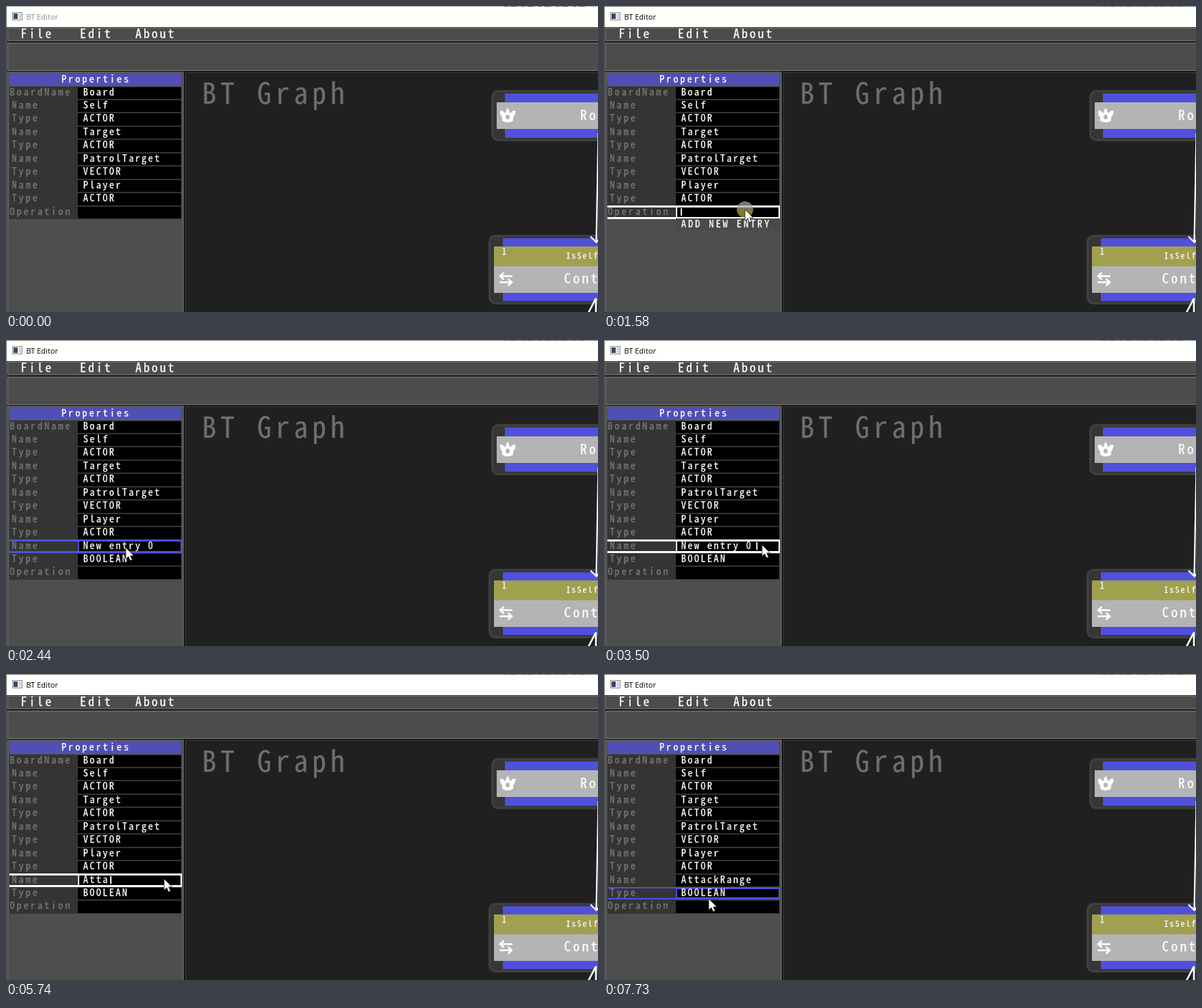
Write an HTML page that moves like this. It is 865 px wide and 448 px high and loops after 8 s.

```html
<!DOCTYPE html>
<html lang="en">
<head>
<meta charset="utf-8">
<title>BT Editor</title>
<style>
  html, body { margin: 0; width: 100%; height: 100%; overflow: hidden; background: #202020; }
  svg { display: block; width: 865px; height: 448px; }
  text { white-space: pre; }
  #title { font: 11px "Open Sans", sans-serif; }
</style>
</head>
<body>
<svg id="stage" viewBox="0 0 865 448" xmlns="http://www.w3.org/2000/svg"></svg>
<script>
const LOOP = 8000;
const ROW_TOP = 117.5, PITCH = 19.45;
const BLUE = '#5050dc', WHITE = '#fffff6';
const FONT = "'Noto Sans Mono CJK JP', 'Noto Sans Mono CJK SC', 'Noto Sans Mono', monospace";

const ruler = document.createElement('canvas').getContext('2d');
ruler.font = '100px ' + FONT;
const ADVANCE = ruler.measureText('0').width / 100;

const rect = (x, y, w, h, fill, extra = '') =>
  `<rect x="${x}" y="${y}" width="${w}" height="${h}" fill="${fill}" ${extra}/>`;
// Monospaced text with a given distance between letters.
const mono = (x, y, size, step, fill, str, id = '') =>
  `<text ${id && `id="${id}"`} x="${x}" y="${y}" font-family="${FONT}" font-size="${size}" fill="${fill}" stroke="${fill}" stroke-width=".25" letter-spacing="${(step - size * ADVANCE).toFixed(2)}">${str}</text>`;
const rowY = i => Math.round(ROW_TOP + i * PITCH);
const indent = label => label.length > 4 ? 5.5 : 8.5;

function row(i, label, value) {
  const y = rowY(i), h = rowY(i + 1) - y;
  return `<g id="row${i}">` +
    rect(5, y, 251, h, '#343434') +
    rect(105, y + 1, 151, h - 2, '#000') +
    mono(indent(label), y + 13, 14.5, 10.1, '#7a7a7a', label, 'label' + i) +
    mono(112.8, y + 13, 14.5, 9.48, WHITE, value, 'value' + i) + '</g>';
}

function node(x, y, h, blueX) {
  return rect(x + 2, y + 2, 190, h - 4, '#303030', 'rx="8" stroke="#3e3e3e" stroke-width="4"') +
    rect(x + 5, y + 5, 20, h - 10, '#363636', 'rx="4"') +
    rect(blueX, y + 5, 150, h - 10, BLUE);
}

const entries = [
  ['BoardName', 'Board'], ['Name', 'Self'], ['Type', 'ACTOR'], ['Name', 'Target'],
  ['Type', 'ACTOR'], ['Name', 'PatrolTarget'], ['Type', 'VECTOR'], ['Name', 'Player'],
  ['Type', 'ACTOR'], ['Operation', ''], ['Type', 'BOOLEAN'], ['Operation', '']
];

const titleBar =
  rect(0, 0, 865, 31, '#fffffc') +
  rect(0, 0, 865, 1, '#a8a8a8', 'id="edge"') +
  '<path d="M728 .5H850" stroke="#505050" stroke-dasharray="5 4 9 7"/>' +
  rect(9.5, 9.5, 14, 11, '#f2f2f2', 'stroke="#8c8c8c"') +
  rect(11, 11, 6, 8, '#3c4468') + rect(18.5, 11, 3.5, 8, '#cfd2da') +
  '<text id="title" x="29.5" y="20">BT Editor</text>';

const frame = 'stroke="#787878"';
const bars =
  rect(0, 31, 865, 66, '#292929') +
  rect(2.5, 32.5, 880, 18, '#4c4c4c', frame) +
  rect(2.5, 54.5, 880, 40, '#4c4c4c', frame) +
  mono(21.5, 47, 18, 11.9, '#fff', 'File') +
  mono(108, 47, 18, 11.9, '#fff', 'Edit') +
  mono(189, 47, 18, 11.9, '#fff', 'About');

const graph =
  rect(259, 95, 620, 370, '#161616') +
  rect(262.5, 97.5, 620, 370, '#202020', 'stroke="#3c3c3c"') +
  mono(286.5, 143, 41.5, 26.8, '#6e6e6e', 'BT Graph') +
  node(709, 123, 75, 729) +
  rect(717, 141, 150, 39, '#b4b4b4') +
  mono(839, 166.5, 19.5, 13, '#fff', 'Ro') +
  `<path fill="#fff" d="M722 154Q725 151 728 156L730 157Q730 153 733 149Q736 153 736 157L738 156Q741 151 744.500 154Q745 158 741 163V168Q733 173 725 168V163Q721 158 722 154Z"/>
   <ellipse cx="733" cy="162.500" rx="3" ry="3.500" fill="#b4b4b4"/>` +
  node(705, 335, 102, 726) +
  rect(713, 352, 155, 29, '#a0a04e') +
  rect(713, 381, 155, 39, '#b4b4b4') +
  mono(724.5, 364, 13, 8, '#fff', '1') +
  mono(818.5, 370, 12, 8, '#fff', 'IsSelf') +
  mono(815.5, 406, 19.5, 13, '#fff', 'Cont') +
  `<g fill="none" stroke="#fff" stroke-width="2.600">
     <path d="M740 395.500H723M727.500 390.500L722 395.500L727.500 400.500M721 404.500H738M733.500 399.500L739 404.500L733.500 409.500"/>
     <path stroke-width="2.200" d="M865.500 186L862.500 345M854 337.500L862.500 346L868 340"/>
     <path d="M851 449L862 428V449"/>
   </g>`;

const panel =
  rect(0, 95, 260, 353, '#292929') +
  rect(2.5, 97.5, 256.5, 370, '#4e4e4e', frame) +
  rect(5, 99, 251, 18, '#5050b4') +
  mono(81, 112, 14.5, 10.1, '#fff', 'Properties') +
  entries.map(([label, value], i) => row(i, label, value)).join('');

const overlay =
  `<path id="focus"/>` +
  rect(0, 296, 2, 11, WHITE, 'id="caret"') +
  `<g id="menu">${rect(106, 312, 150.5, 15.5, '#4a4a4a', 'id="option" stroke-width="2"')}
   ${mono(112.8, 324, 14.5, 10.12, '#fff', 'ADD NEW ENTRY')}</g>` +
  `<g id="pointer">
     <circle id="ring" r="12" fill="url(#glow)"/>
     <path d="M0 0V16.500L3.800 13L6.500 19L9.400 17.700L6.800 11.900H11.800Z" fill="#fff" stroke="#222" stroke-width=".8"/>
   </g>`;

document.getElementById('stage').innerHTML =
  `<defs><linearGradient id="glow" x2="0" y2="1">
     <stop offset=".35" stop-color="#a5a5a0" stop-opacity=".72"/>
     <stop offset=".65" stop-color="#b0aa3c" stop-opacity=".72"/>
   </linearGradient></defs>` +
  titleBar + bars + graph + panel + rect(0, 0, 1, 448, '#707070') + overlay;

const $ = id => document.getElementById(id);
const el = Object.fromEntries(
  ['edge', 'title', 'row10', 'row11', 'label9', 'value9', 'label10', 'value10',
    'focus', 'caret', 'menu', 'option', 'pointer', 'ring'].map(id => [id, $(id)]));
// The focus outline must lie below the text of its row.
el.focus.after(el.label9, el.value9, el.label10, el.value10);

// time, x, y
const path = [
  [310, 330, 470], [800, 205, 326], [1200, 205, 326], [1480, 206, 298], [1700, 206, 298],
  [1990, 204, 315], [2200, 204, 315], [2440, 175, 304], [2700, 231, 300], [7560, 231, 300], [7730, 153, 329]
];
const clicks = [[860, 1080], [1510, 1690], [2070, 2230], [2720, 2870], [3180, 3500]];
// time, row (-1 for none), colour
const focusSteps = [
  [0, -1], [1370, 9, BLUE], [1560, 9, WHITE], [2190, 10, BLUE], [2330, 9, BLUE],
  [2760, 9, WHITE], [7060, 9, BLUE], [7650, 10, BLUE]
];
const ADDED = 2190;
const keys = [5290, 5520, 5630, 5740, 5910, 6040, 6480, 6555, 6630, 6705, 6780];

function pointerAt(t) {
  const i = path.findIndex(p => p[0] > t);
  if (i === 0) return path[0].slice(1);
  if (i < 0) return path[path.length - 1].slice(1);
  const [t0, x0, y0] = path[i - 1], [t1, x1, y1] = path[i];
  const u = (t - t0) / (t1 - t0), e = u * u * (3 - 2 * u);
  return [x0 + (x1 - x0) * e, y0 + (y1 - y0) * e];
}

function entryText(t) {
  const name = 'New entry 0';
  if (t < ADDED) return '';
  if (t < 4030) return name;
  if (t < 4540) return name.slice(0, 10);
  if (t < 4780) return name.slice(0, 9 - Math.floor((t - 4540) / 30));
  return 'AttackRange'.slice(0, keys.filter(k => k <= t).length);
}

// Lines above and below the row, and a box around its value.
function outline(i) {
  const y = i === 9 ? 292 : 312, bottom = i === 9 ? 312 : 330;
  const line = i === 9 ? 3 : 2, edge = 3;
  const box = (x, y, w, h) => `M${x} ${y}h${w}v${h}h${-w}z`;
  return box(5, y, 251, line) + box(5, bottom - line, 251, line) +
    box(105, y, 152, edge) + box(105, bottom - edge, 152, edge) +
    box(105, y, 2, bottom - y) + box(255, y, 2, bottom - y);
}

const show = (node, on) => node.setAttribute('visibility', on ? 'visible' : 'hidden');

function render(t) {
  const active = t >= 880, added = t >= ADDED;
  el.title.setAttribute('fill', active ? '#000' : '#8c8c8c');
  el.edge.setAttribute('fill', active ? '#707070' : '#a8a8a8');

  for (const id of ['row10', 'row11', 'label10', 'value10']) show(el[id], added);
  const text = entryText(t), label = added ? 'Name' : 'Operation';
  el.label9.textContent = label;
  el.label9.setAttribute('x', indent(label));
  el.value9.textContent = text;

  const [, index, color] = focusSteps.filter(s => s[0] <= t).pop();
  show(el.focus, index >= 0);
  if (index >= 0) {
    el.focus.setAttribute('d', outline(index));
    el.focus.setAttribute('fill', color);
  }
  show(el.caret, color === WHITE);
  el.caret.setAttribute('x', 112 + 10.03 * text.length);
  show(el.menu, t >= 1560 && !added);
  el.option.setAttribute('stroke', t >= 1880 ? BLUE : '#4a4a4a');

  const [x, y] = pointerAt(t);
  el.pointer.setAttribute('transform', `translate(${x.toFixed(2)} ${y.toFixed(2)})`);
  show(el.pointer, t >= 310);
  el.ring.setAttribute('opacity', clicks.some(([a, b]) => t >= a && t < b) ? 1 : 0);
}

const start = performance.now();
function tick() {
  render((performance.now() - start) % LOOP);
  requestAnimationFrame(tick);
}
tick();
</script>
</body>
</html>
```
